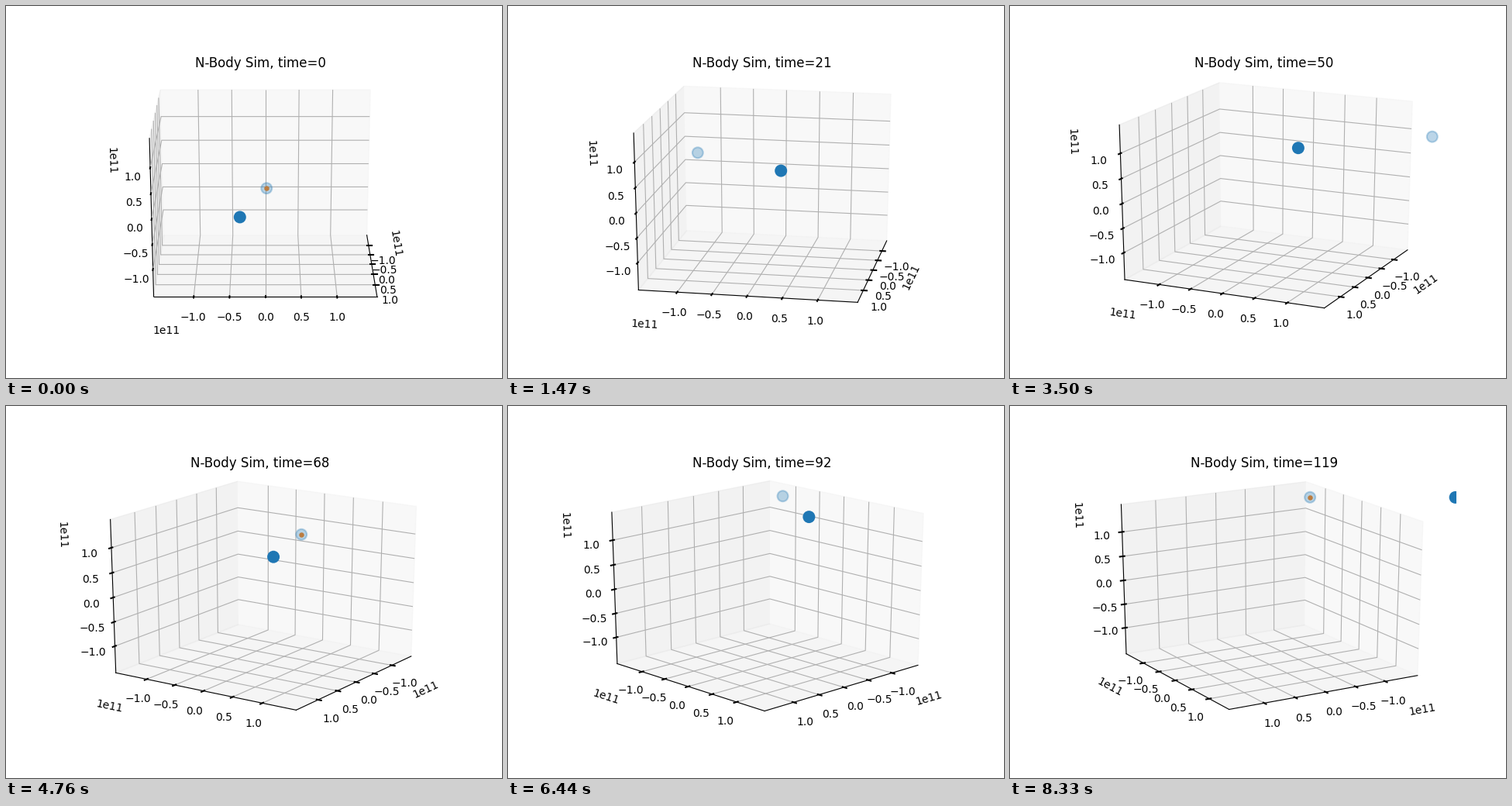
These frames come from a looping animation (640 by 480 pixels, 8400 ms). A matplotlib script:

```python
import numpy as np
import matplotlib.pyplot as plt
from matplotlib.animation import FuncAnimation
from matplotlib.collections import LineCollection
from matplotlib.colors import to_rgba
from matplotlib.patches import Polygon

FRAMES, STEP_MS = 120, 70
ELEV, DIST = np.radians(20), 10
AU = 0.5                      # the cube spans -1 AU .. 1 AU and has side 1
UNIT = AU / 1.496             # one 1e11 m in cube units
TICKS = [-1.0, -0.5, 0.0, 0.5, 1.0]
DELTA = 1 / 12
EDGE = AU + DELTA / 4         # outer faces of the drawn box
PER_POINT = 48 / (72 * (4.96 + 3.696)) * DELTA
TICK_PAD = EDGE + 11.5 * PER_POINT
OFFSET_PAD = EDGE + 25 * PER_POINT

# Heavy body drifts steadily, light body follows an ellipse around it.
DRIFT = np.array([-0.0001, 0.00285, 0.00587])
START = 2
SEMI, ECC, PERIOD, TILT = 0.605, 0.172, 72.65, 0.1

fig = plt.figure(figsize=(6.4, 4.8), dpi=100, facecolor="white")
ax = fig.add_axes([0.125, 0.11, 0.775, 0.77])
ax.set_axis_off()
ax.set_xlim(-0.095, 0.09)
ax.set_ylim(-0.095, 0.09)
title = fig.text(0.5125, 1 - 78.8 / 480, "", size=12, ha="center")


def project(points, azim):
    """Perspective view of cube points: screen x, screen y, depth."""
    x, y, z = np.asarray(points, float).T
    right = y * np.cos(azim) - x * np.sin(azim)
    near = x * np.cos(azim) + y * np.sin(azim)
    depth = DIST - near * np.cos(ELEV) - z * np.sin(ELEV)
    up = z * np.cos(ELEV) - near * np.sin(ELEV)
    return np.column_stack([right / depth, up / depth, depth])


def bodies(frame):
    w = frame + START
    star = DRIFT * w
    mean = 2 * np.pi * w / PERIOD
    ecc_anom = mean
    for _ in range(30):
        ecc_anom = mean + ECC * np.sin(ecc_anom)
    x = SEMI * (np.cos(ecc_anom) - ECC)
    side = -SEMI * np.sqrt(1 - ECC**2) * np.sin(ecc_anom) / np.hypot(1, TILT)
    return np.array([star, star + [x, side, TILT * side]])


class Pane:
    def __init__(self, corners, grey):
        self.corners = np.array(corners) * EDGE
        self.patch = Polygon(np.zeros((4, 2)), closed=False, lw=1, zorder=1,
                             color=(grey, grey, grey, 0.5))
        ax.add_patch(self.patch)

    def update(self, azim):
        self.patch.set_xy(project(self.corners, azim)[:, :2])


class Axis3:
    """One box edge with its ticks, labels, exponent and wall grid lines."""

    def __init__(self, index, signs, tick_dir, offset_end, offset_ha, order):
        self.index, self.tick_dir = index, tick_dir
        self.signs = np.array(signs, float)
        self.offset_end = offset_end
        self.line, = ax.plot([], [], color="k", lw=0.8, zorder=order)
        self.grid = LineCollection([], colors="#b0b0b0", linewidths=0.8,
                                   zorder=order + 0.1)
        ax.add_collection(self.grid, autolim=False)
        self.marks = [ax.plot([], [], color="k", lw=1.5, zorder=order + 0.2)[0]
                      for _ in TICKS]
        self.labels = [ax.text(0, 0, f"{t:.1f}".replace("-", "\u2212"),
                               size=10, ha="center", va="top", zorder=order + 0.3)
                       for t in TICKS]
        self.offset = ax.text(0, 0, "1e11", size=10, ha=offset_ha, va="center",
                              rotation_mode="anchor", zorder=order + 0.3)

    def at(self, value, reach=EDGE):
        point = self.signs * reach
        point[self.index] = value
        return point

    def wall_line(self, value):
        corner = np.full(3, -EDGE)
        corner[self.index] = value
        first, last = corner.copy(), corner.copy()
        first[(self.index + 1) % 3] = EDGE
        last[(self.index + 2) % 3] = EDGE
        return [first, corner, last]

    def update(self, azim):
        ends = project([self.at(-EDGE), self.at(EDGE)], azim)
        self.line.set_data(ends[:, 0], ends[:, 1])
        self.grid.set_segments([project(self.wall_line(t * UNIT), azim)[:, :2]
                                for t in TICKS])

        for t, mark, label in zip(TICKS, self.marks, self.labels):
            inner, outer = self.at(t * UNIT), self.at(t * UNIT)
            inner[self.tick_dir] -= 0.1 * DELTA
            outer[self.tick_dir] += 0.2 * DELTA
            p = project([inner, outer, self.at(t * UNIT, TICK_PAD)], azim)
            mark.set_data(p[:2, 0], p[:2, 1])
            label.set_position(p[2, :2])

        spot = project([self.at(self.offset_end * EDGE, OFFSET_PAD)], azim)[0]
        dx, dy = np.diff(ax.transData.transform(ends[:, :2]), axis=0)[0]
        angle = np.degrees(np.arctan2(dy, dx)) % 180
        self.offset.set_position(spot[:2])
        self.offset.set_rotation(angle - 180 if angle > 90 else angle)


panes = [
    Pane([(-1, -1, -1), (-1, 1, -1), (-1, 1, 1), (-1, -1, 1)], 0.95),
    Pane([(-1, -1, -1), (1, -1, -1), (1, -1, 1), (-1, -1, 1)], 0.90),
    Pane([(-1, -1, -1), (1, -1, -1), (1, 1, -1), (-1, 1, -1)], 0.925),
]
axes3 = [
    Axis3(0, (0, 1, -1), 1, -1, "right", 2),
    Axis3(1, (1, 0, -1), 0, -1, "left", 3),
    Axis3(2, (1, -1, 0), 0, 1, "left", 4),
]
core = ax.scatter([0], [0], s=10, color="C1", linewidths=1.5, zorder=6)
dots = ax.scatter([0, 0], [0, 0], s=100, linewidths=1.5, zorder=7)


def update(frame):
    azim = np.radians(frame / 2)
    for part in panes + axes3:
        part.update(azim)
    p = project(bodies(frame), azim)
    core.set_offsets(p[:1, :2])
    # Far body first and faded, near body solid on top.
    dots.set_offsets(p[np.argsort(-p[:, 2]), :2])
    colors = [to_rgba("C0", 0.3), to_rgba("C0", 1.0)]
    dots.set_facecolor(colors)
    dots.set_edgecolor(colors)
    title.set_text(f"N-Body Sim, time={frame}")
    return []


anim = FuncAnimation(fig, update, frames=FRAMES, interval=STEP_MS,
                     init_func=lambda: update(0), repeat=True, repeat_delay=0)
plt.show()
```
